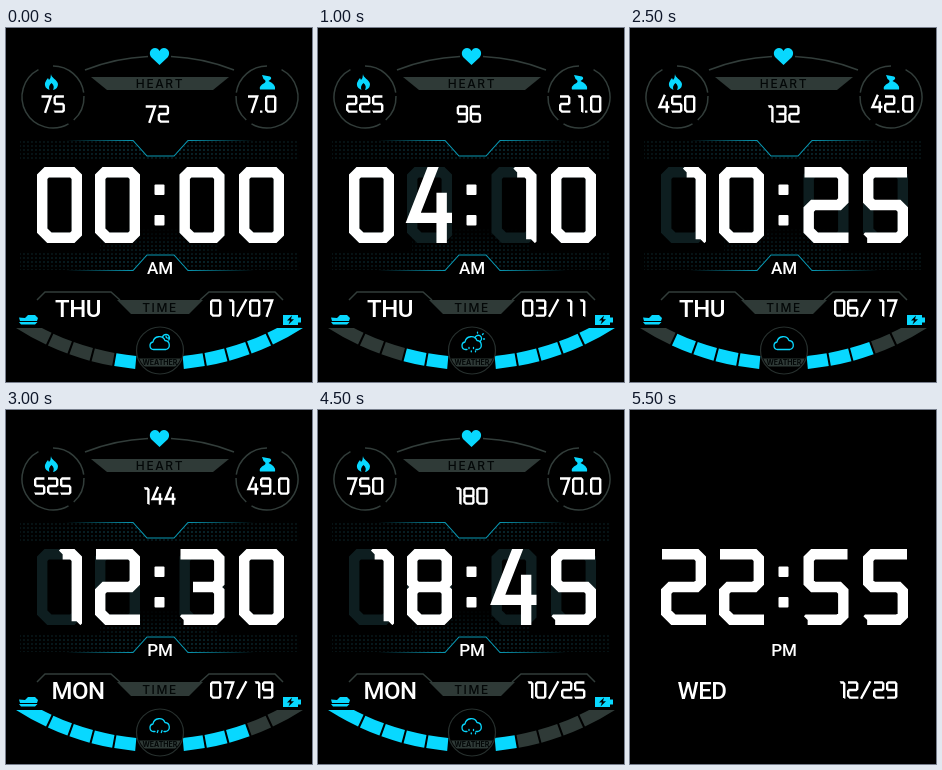
Recreate the animation shown at these times as an HTML page. Size 306x354 px, loop 6 s.

```html
<!DOCTYPE html>
<html lang="en">
<head>
<meta charset="utf-8">
<title>Watch face</title>
<style>
html, body { margin: 0; width: 100%; height: 100%; overflow: hidden; background: #000; }
svg { display: block; width: 100vw; height: 100vh; }
.line { fill: none; stroke: #323d3a; stroke-width: 1.5; }
.plate { fill: #2f3a37; }
.cyan { fill: #08d8ff; }
.digits { fill: none; stroke: #fff; stroke-miterlimit: 6; }
.ghost { stroke: #0e1e20; }
.edge { fill: none; stroke: url(#fade); stroke-width: 1.1; }
.wx { fill: none; stroke: #08d8ff; stroke-width: 1.3; stroke-linecap: round; stroke-linejoin: round; }
.label { font-family: Inter, sans-serif; font-weight: 500; fill: #030707; text-anchor: middle; }
.day { font: 500 24px Roboto, sans-serif; letter-spacing: -.5px; fill: #fff; text-anchor: middle; }
.half { font: 500 17px Roboto, sans-serif; letter-spacing: -.2px; fill: #fff; text-anchor: middle; }
</style>
</head>
<body>
<svg viewBox="0 0 306 354" preserveAspectRatio="none">
  <defs>
    <linearGradient id="fade" gradientUnits="userSpaceOnUse" x1="60" x2="248" y1="0" y2="0">
      <stop offset="0" stop-color="#0899b4" stop-opacity="0"/>
      <stop offset=".36" stop-color="#0899b4"/>
      <stop offset=".64" stop-color="#0899b4"/>
      <stop offset="1" stop-color="#0899b4" stop-opacity="0"/>
    </linearGradient>
    <radialGradient id="dotFade">
      <stop offset="0" stop-color="#0c3b45"/>
      <stop offset=".5" stop-color="#0a2a31"/>
      <stop offset="1" stop-color="#08191c"/>
    </radialGradient>
    <radialGradient id="glow" cy="1" r=".9">
      <stop offset="0" stop-color="#0a2a31"/>
      <stop offset="1" stop-color="#0a2a31" stop-opacity="0"/>
    </radialGradient>
    <pattern id="holes" width="4" height="4" patternUnits="userSpaceOnUse">
      <circle cx="2" cy="2" r=".95" fill="#fff"/>
    </pattern>
    <mask id="dots"><rect width="306" height="354" fill="url(#holes)"/></mask>
    <clipPath id="arcClip"><rect y="300" width="306" height="54"/></clipPath>
    <clipPath id="clockClip"><rect y="139" width="306" height="76"/></clipPath>
    <clipPath id="badgeClip"><circle cx="154" cy="322" r="22.5"/></clipPath>
  </defs>
  <rect width="306" height="354"/>

  <g id="dial">
    <path class="line" d="M79 42Q109 30 142 28.5M165 28.5Q198 30 228 42"/>
    <path class="cyan" d="M153.5 37L145.500 29.500C142 25.500 144.500 20 149 20Q152 20 153.500 23Q155 20 158 20C162.500 20 165 25.500 161.500 29.500Z"/>
    <path class="plate" d="M85 49H223L207 62H101Z"/>
    <text class="label" x="154" y="60" font-size="12" letter-spacing="1.6">HEART</text>

    <g id="rings"></g>
    <path class="cyan" fill-rule="evenodd" d="M45 46C45 50 51 51 52 56Q52 61 47 62Q49 58 45.500 55Q42 58 43.500 62Q38 60 39 55Q40 52 42 50L43 52Q45 50 45 46Z"/>
    <path class="cyan" d="M256 47L264 48.500Q267 50.500 262.500 53Q270 56 269 61.500H254Q252.500 58 258.500 55Q261 53 257.500 51Z"/>

    <g mask="url(#dots)">
      <path fill="url(#dotFade)" d="M14 113H127L141 129H168L182 113H293V133H14Z"/>
      <path fill="url(#dotFade)" d="M14 242H127L141 226H168L182 242H293V224H14Z"/>
      <path fill="url(#glow)" d="M94 196H213V224H94Z"/>
    </g>
    <path class="edge" d="M55 112.500H127L141 128H168L182 112.500H253"/>
    <path class="edge" d="M55 242.500H127L141 227H168L182 242.500H253"/>

    <path class="line" d="M31 272L39 264H105L114 272M194 272L203 264H269L277 272"/>
    <path class="plate" d="M111 272H197L183 286H125Z"/>
    <text class="label" x="154" y="283.500" font-size="12" letter-spacing="1.6">TIME</text>

    <g id="gauge" clip-path="url(#arcClip)" fill="none" stroke-width="13"></g>
    <path class="cyan" d="M13 289.500L19 290L22 287H29L32 290L31 293H14ZM13 294H31.500L29 296.500H15Z"/>
    <path class="cyan" d="M277 287H292V289.500H295V294.500H292V297H277Z"/>
    <path d="M286 287.500L281 292.500H284L282.500 296.500L288 291.200H285Z"/>

    <circle cx="154" cy="322.500" r="23.500" fill="#000" stroke="#27302e" stroke-width="1.2"/>
    <rect class="plate" x="130" y="330.500" width="48" height="8" clip-path="url(#badgeClip)"/>
    <text class="label" x="154" y="337" font-size="7" style="font-weight: 700">WEATHER</text>
    <path id="weather" class="wx" transform="translate(0 -1.5)"/>
    <g class="digits" stroke-width="2.4">
      <path id="kcal"/><path id="pulse"/><path id="dist"/>
    </g>
    <path id="ghost" class="digits ghost" stroke-width="10.4"/>
  </g>

  <path id="clock" class="digits" stroke-width="10.4" clip-path="url(#clockClip)"/>
  <g fill="#fff">
    <rect x="148.5" y="156.500" width="10" height="10.500" rx="1"/>
    <rect x="148.5" y="187" width="10" height="10.500" rx="1"/>
  </g>
  <text id="half" class="half" x="154" y="245.500"></text>
  <text id="day" class="day" x="72" y="288.500"></text>
  <path id="date" class="digits" stroke-width="2.4"/>
</svg>
<script>
const STEP = 500, COUNT = 12;
const $ = id => document.getElementById(id);
const pad = n => String(n).padStart(2, "0");
const days = ["THU", "TUE", "THU", "TUE", "SAT", "THU", "MON", "SAT", "THU", "MON", "SAT", "WED"];

// Centre-line paths of the angular digits, for a box w by h and stroke t.
function glyph(ch, x, y, w, h, t) {
  const L = x + t / 2, R = x + w - t / 2, T = y + t / 2, B = y + h - t / 2, M = y + h / 2;
  const c = w * .1, f = w * .16, E = x + w;
  const join = pts => "M" + pts.map(p => p.join(" ")).join("L");
  const back = pts => pts.slice().reverse();
  // A short diagonal tail gives a slanted stroke end.
  const cut = (px, py) => [[px, py], [px - .1, py + .1]];
  const tl = [[L + c, T], [L, T + c]], tr = [[R - c, T], [R, T + c]];
  const bl = [[L, B - f], [L + f, B]], br = [[R, B - c], [R - c, B]];
  const upR = [[R, M - c], [R - c, M]], downR = [[R - c, M], [R, M + c]];
  const upL = [[L, M - c], [L + c, M]], downL = [[L + c, M], [L, M + c]];
  const foot = cut(x + t * .4, B);
  switch (ch) {
    case "0": return join([...tl, ...bl, ...back(br), ...back(tr)]) + "Z";
    case "1": return join([...back(cut(x + w * .57, T)), ...tr, ...cut(R, B + t * .15)]);
    case "2": return join([[x + 1, T], ...tr, ...upR, ...downL, ...bl, [E, B]]);
    case "3": return join([[x + 1, T], ...tr, ...upR, ...downR, ...br, ...foot]) +
                     join([[x + w * .3, M], [R - c, M]]);
    case "4": return join([[x + w * .6, y - h * .03], [L + t * .1, y + h * .67], [E, y + h * .67]]) +
                     join([[x + w * .77, y + h * .34], [x + w * .77, y + h]]);
    case "5": return join([[E - 1, T], ...tl, ...upL, ...downR, ...br, ...foot]);
    case "6": return join([[E - c, T], ...tl, ...bl, ...back(br), ...back(downR), [L, M]]);
    case "7": return join([[x + 1, T], [R, T], [x + w * .4, y + h]]);
    case "8": return join([...tl, ...upL, ...downL, ...bl, ...back(br), ...back(downR),
                           ...back(upR), ...back(tr)]) + "Z" + join([[L + c, M], [R - c, M]]);
    case "9": return join([[x + c, B], ...back(br), ...back(tr), ...tl, ...upL, [R, M]]);
    case "/": return join([[x + 1, y + h], [E - 1, y]]);
    case ".": return join([[x, B], [x + t, B]]);
  }
}

function small(id, text, x, y) {
  let d = "";
  for (const ch of text) {
    d += glyph(ch, x, y, 11.4, 17.5, 2.4);
    x += ch === "." ? 5 : 13;
  }
  $(id).setAttribute("d", d);
  $(id).setAttribute("aria-label", text);
}

const big = text => [...text].map((ch, i) =>
  glyph(ch, [31, 89, 173.5, 233][i], 139, 45, 76, 10.4)).join("");

function polar(cx, cy, r, deg) {
  const a = deg * Math.PI / 180;
  return `${cx + r * Math.sin(a)} ${cy + r * Math.cos(a)}`;
}
const arc = (cx, cy, r, a, b) =>
  `M${polar(cx, cy, r, a)}A${r} ${r} 0 ${+(Math.abs(b - a) > 180)} ${b > a ? 0 : 1} ${polar(cx, cy, r, b)}`;

function addPath(parent, d, cls) {
  const p = document.createElementNS("http://www.w3.org/2000/svg", "path");
  p.setAttribute("d", d);
  if (cls) p.setAttribute("class", cls);
  return $(parent).appendChild(p);
}

for (const [cx, side] of [[47, 1], [261, -1]])
  for (const [a, b] of [[-152, 30], [42, 92], [98, 180]])
    addPath("rings", arc(cx, 69, 31, a * side, b * side), "line");

// Gauge blocks, counted outwards from the badge.
const gauge = [-1, 1].map(side => [0, 1, 2, 3, 4].map(i =>
  addPath("gauge", arc(153.5, 76, 259.5, side * (5 * i + 5.25), side * (i < 4 ? 5 * i + 9.8 : 36)))));

const cloud = "M149 323H147.500A3.800 3.800 0 0 1 147 315.500A6.300 6.300 0 0 1 159 314A4.600 4.600 0 0 1 160 323H158";
const base = "M149 323H158";
const sun = "M157 311.500A3.300 3.300 0 1 1 162.500 314.500M159.500 306.500v-.8M164.500 308l.7-.7M165.500 312.500h1";
const moon = "M156.500 311A3.500 3.500 0 1 1 162.800 313.500M160 309.500Q160 312 162.500 311.500";
const drops = n => n === 1 ? "M153.500 321v2.500" :
  n === 2 ? "M152 322l-.7 2M156 322l-.7 2" :
  "M151 321v1M155.500 321v1M153.300 324.500v.8M157.500 324.500v.8";
const sky = [
  [moon, base], [sun, base], [sun, drops(3)], [sun, drops(2)], [sun, drops(1)], ["", base],
  ["", drops(2)], ["", drops(1)], ["", drops(2)], ["", drops(3)], ["", base], ["", base]
];

$("ghost").setAttribute("d", big("0000"));

function show(k) {
  const time = pad(2 * k) + pad(5 * k);
  $("clock").setAttribute("d", big(time));
  $("clock").setAttribute("aria-label", time);
  $("half").textContent = k < 6 ? "AM" : "PM";
  $("day").textContent = days[k];
  small("date", pad(k + 1) + "/" + pad(7 + 2 * k), 204, 271.3);
  $("dial").style.display = k < 10 ? "" : "none";

  const kcal = String(75 * (k + 1)), pulse = String(72 + 12 * k);
  small("kcal", kcal, 47.5 - 6.5 * kcal.length, 67.3);
  small("pulse", pulse, 151.7 - 6.5 * pulse.length, 77.3);
  small("dist", (7 * (k + 1)).toFixed(1), 241, 67.3);
  $("weather").setAttribute("d", cloud + sky[k].join(""));

  const lit = [k < 6 ? 1 + Math.ceil(k / 2) : 5, k < 3 ? 5 : 5 - Math.floor((k - 1) / 2)];
  gauge.forEach((row, s) => row.forEach((p, i) =>
    p.setAttribute("stroke", i < lit[s] ? "#08d8ff" : "#2f3a37")));
}

let last = -1;
const start = performance.now();
function tick(now) {
  const k = Math.floor(Math.max(0, now - start) / STEP) % COUNT;
  if (k !== last) show(last = k);
  requestAnimationFrame(tick);
}
tick(start);
</script>
</body>
</html>
```
